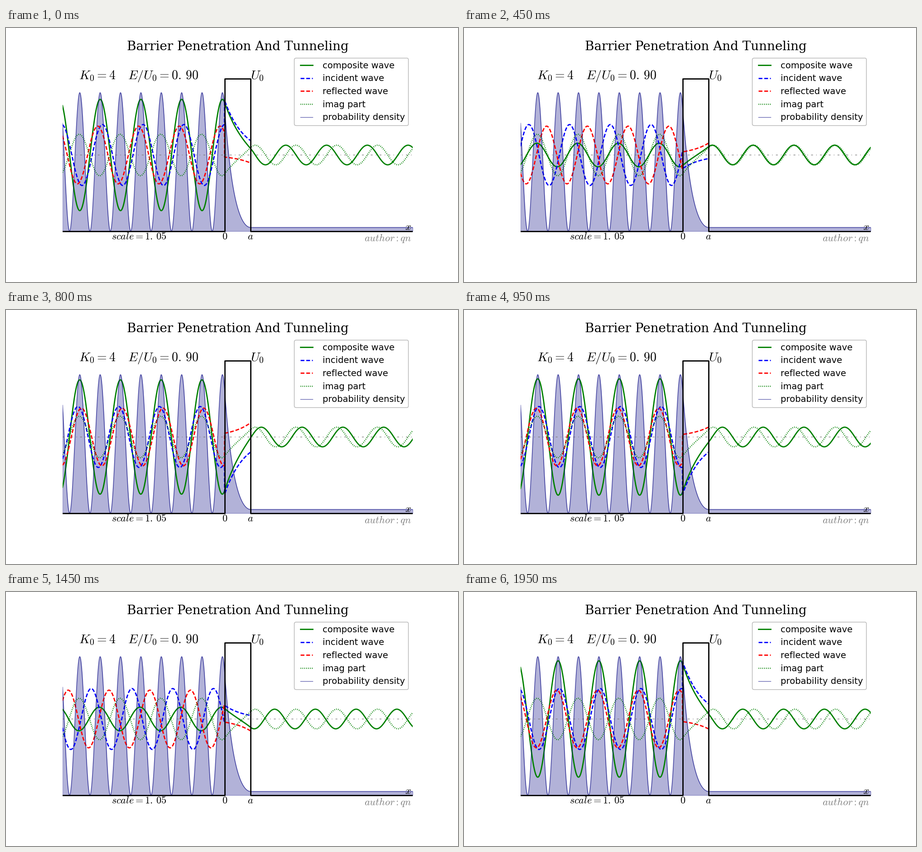
A matplotlib script for the animation above (2000 ms loop, 998 px wide and 561 px high).

```python
import numpy as np
import matplotlib.pyplot as plt
from matplotlib.animation import FuncAnimation

W, H, DPI = 998, 561, 100
FRAMES, INTERVAL = 40, 50

plt.rcParams.update({
    "font.family": "DejaVu Sans",
    "mathtext.fontset": "cm",
})

# Barrier on 0 <= x <= 1, wave number k outside, decay rate q inside
k, energy = 4.0, 0.90
q = k * np.sqrt(1 / energy - 1)
U = 2.5

x = np.linspace(-6.25, 7.25, 1351)
left, right = x < -1e-9, x > 1 + 1e-9

denom = (k**2 - q**2) * np.sinh(q) + 2j * k * q * np.cosh(q)
r = (k**2 + q**2) * np.sinh(q) / denom
total, slope = 1 + r, 1j * k * (1 - r) / q
decay, growth = (total - slope) / 2, (total + slope) / 2
t = (decay * np.exp(-q) + growth * np.exp(q)) * np.exp(-1j * k)


def piecewise(before, inside, after):
    return np.where(left, before, np.where(right, after, inside))


wave = np.exp(1j * k * x)
incident = piecewise(wave, decay * np.exp(-q * x), np.nan)
reflected = piecewise(r / wave, growth * np.exp(q * x), np.nan)
psi = piecewise(wave + r / wave,
                decay * np.exp(-q * x) + growth * np.exp(q * x),
                t * wave)
density = 1.2 * np.abs(psi)**2 - U

fig = plt.figure(figsize=(W / DPI, H / DPI), dpi=DPI, facecolor="white")
ax = fig.add_axes([0.125, 0.1, 0.775, 0.8])
ax.set_xlim(x[0], x[-1])
ax.set_ylim(-U / 0.75, U / 0.75)
ax.axis("off")
ax.set_title("Barrier Penetration And Tunneling", fontsize=20,
             family="DejaVu Serif", pad=5)

ax.fill_between(x, density, -U, color="navy", alpha=0.3, lw=1)
ax.plot(x, 0 * x, color="gray", lw=1, ls=(0, (3, 5, 1, 5)))

dashed, dotted = (0, (3, 1.5)), (0, (0.5, 1))
composite_line, = ax.plot(x, psi.real, color="green", lw=2,
                          label="composite wave")
incident_line, = ax.plot(x, incident.real, color="blue", lw=2, ls=dashed,
                         label="incident wave")
reflected_line, = ax.plot(x, reflected.real, color="red", lw=2, ls=dashed,
                          label="reflected wave")
ax.plot(x, psi.imag, color="green", lw=2, ls=dotted, label="imag part")
ax.plot(x, density, color="navy", lw=1, alpha=0.6,
        label="probability density")
ax.plot([x[0], 0, 0, 1, 1, x[-1]], [-U, -U, U, U, -U, -U],
        color="black", lw=2)

ax.legend(loc="upper right", fontsize=14, numpoints=2,
          edgecolor="0.7", framealpha=1)


def label(px, py, text, size=16, ha="center", color="black"):
    fig.text(px / W, 1 - py / H, text, fontsize=size, ha=ha,
             va="baseline", color=color)


label(161, 113, r"$K_0=4$", 20, "left")
label(269, 113, r"$E/U_0=0.\hspace{0.2}90$", 20, "left")
label(540, 113, r"$U_0$", 20, "left")
label(233, 467, r"$scale=1.\hspace{0.2}05$", ha="left")
label(482.8, 467, r"$0$")
label(540, 467, r"$a$")
label(887.5, 446, r"$x$")
label(896, 471, r"$author:qn$", ha="right", color="gray")

moving = [(composite_line, psi), (incident_line, incident),
          (reflected_line, reflected)]


def update(i):
    phase = np.exp(-2j * np.pi * i / FRAMES)
    for line, values in moving:
        line.set_ydata((values * phase).real)
    return [line for line, _ in moving]


anim = FuncAnimation(fig, update, frames=FRAMES, interval=INTERVAL,
                     repeat=True, repeat_delay=0)
plt.show()
```
